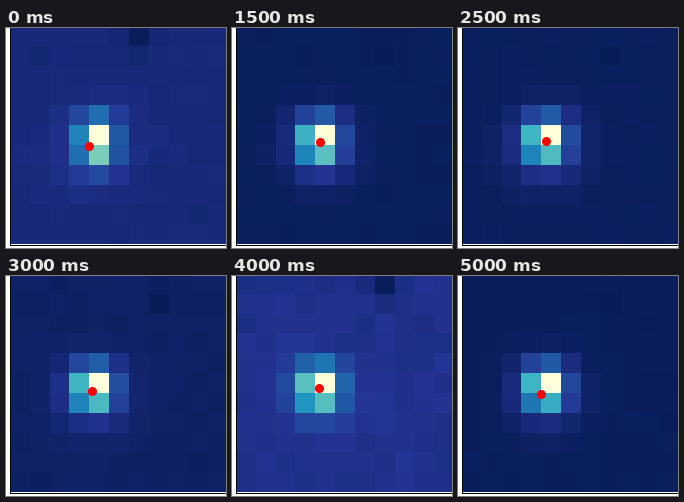
These frames come from a looping animation (220x220 px, 5500 ms). A matplotlib script:

```python
import numpy as np
import matplotlib.pyplot as plt
from matplotlib.animation import FuncAnimation

SIZE, DPI = 220, 100
CELLS, STEPS = 11, 11
LEFT, RIGHT, TOP, BOTTOM = 4, 221.2, -2, 215.8

# Key points of the background level and of the marker path
KEYS = [0, 1, 3, 5, 7, 8, 10]
LEVEL = [.07, .02, .013, .018, .038, .11, .01]
DOT_X = [83, 83, 88, 88, 83, 87, 83]
DOT_Y = [118, 118, 114, 113, 118, 112, 118]

rows, cols = np.mgrid[:CELLS, :CELLS]


def glow(x, y, width):
    return np.exp(-((cols - x) ** 2 + (rows - y) ** 2) / width)


def spot(k):
    """Lopsided peak that settles up and to the left over the loop."""
    dx, dy = cols - 4, rows - 5
    left, right = .78 + .6 * np.exp(-k), 2
    up, down = 1.6, .6 + .03 * k
    across = np.where(dx < 0, left, right) * dx ** 2
    along = np.where(dy < 0, up, down) * dy ** 2
    peak = np.exp(-(across ** 1.4 + along ** 1.4) ** (1 / 1.4))
    total = peak + .1 * glow(3.8, 5.6, 3.5)
    return total / total.max()


def frame(k):
    level = np.interp(k, KEYS, LEVEL)
    noise = np.random.default_rng(k).normal(0, .001 + .06 * level, rows.shape)
    cold = glow(min(7, 6 + k / 3), abs(np.sin(np.pi * k / 8)), .6)
    light = spot(k)
    back = level * (1 - cold) + noise
    return np.clip(back * (1 - light) + light, 0, 1)


fig = plt.figure(figsize=(SIZE / DPI, SIZE / DPI), dpi=DPI, facecolor="white")
ax = fig.add_axes([0, 0, 1, 1])
image = ax.imshow(frame(0), cmap="YlGnBu_r", vmin=0, vmax=1,
                  interpolation="nearest", aspect="auto",
                  extent=(LEFT, RIGHT, BOTTOM, TOP))
dot, = ax.plot([], [], "ro", markersize=5.5, zorder=4)
ax.set(xlim=(0, SIZE), ylim=(SIZE, 0))
ax.axis("off")


def bar(x, y, w, h, color):
    ax.add_patch(plt.Rectangle((x, y), w, h, fc=color, lw=0, aa=False,
                               zorder=3))


bar(LEFT, 216, SIZE, 1, "white")
bar(LEFT, 217, SIZE, 1, "black")
bar(LEFT, 0, 1, 218, "black")


def update(k):
    image.set_data(frame(k))
    dot.set_data([np.interp(k, KEYS, DOT_X)], [np.interp(k, KEYS, DOT_Y)])
    return image, dot


anim = FuncAnimation(fig, update, frames=STEPS, interval=500, repeat=True,
                     repeat_delay=0)
plt.show()
```
